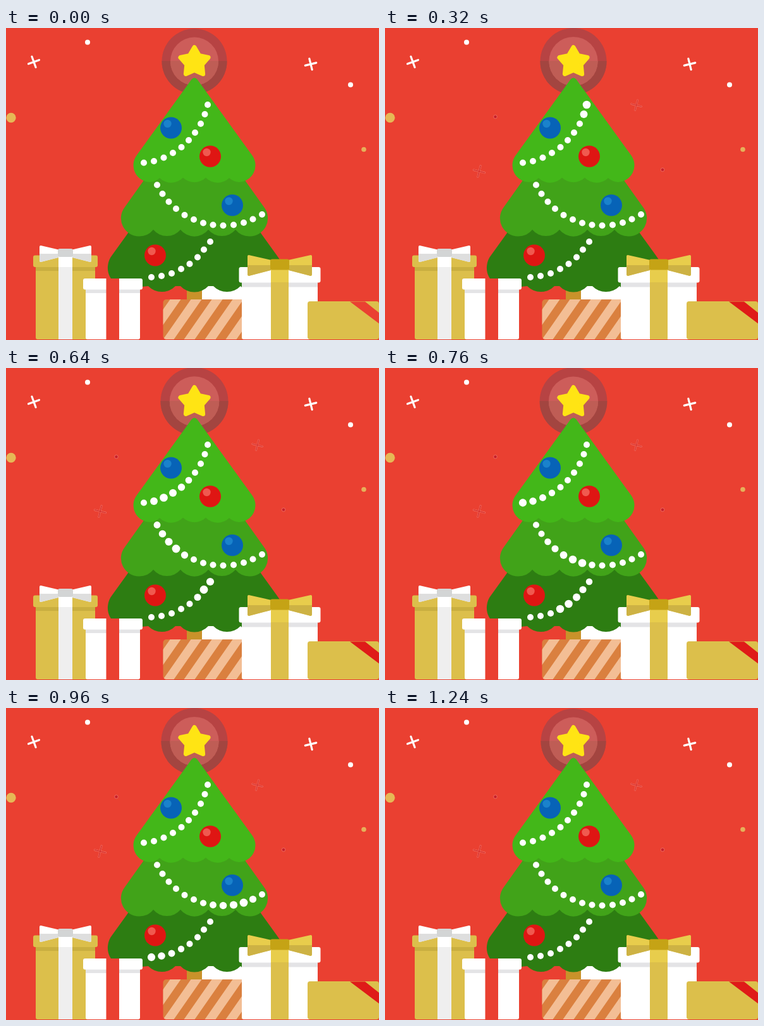
These frames come from a looping animation (590 by 492 pixels, 1.28 s). An HTML page:

```html
<!DOCTYPE html>
<html lang="en">
<head>
<meta charset="utf-8">
<title>Christmas tree</title>
<style>
  html, body { margin: 0; width: 100%; height: 100%; overflow: hidden; background: #ea4031; }
  svg { display: block; }
</style>
</head>
<body>
<svg width="590" height="492" viewBox="0 0 590 492">
  <defs>
    <clipPath id="lowerHalf"><rect y="52" width="590" height="80"/></clipPath>
    <clipPath id="stripedBox"><rect x="248.500" y="428" width="130" height="63" rx="5"/></clipPath>
    <path id="plus" d="M-9 0H9M0-9V9" stroke-linecap="round"/>
  </defs>

  <!-- sky -->
  <g fill="#fff" stroke="#fff" stroke-width="3.2">
    <use href="#plus" transform="translate(44 53.5) rotate(-20)"/>
    <use href="#plus" transform="translate(482 57) rotate(-14)"/>
  </g>
  <circle cx="129" cy="22.5" r="4" fill="#fff"/>
  <circle cx="545" cy="89.5" r="4" fill="#fff"/>
  <circle cx="8" cy="141.5" r="7.7" fill="#e6b856"/>
  <circle cx="566" cy="191.5" r="3.8" fill="#e6b05a"/>
  <g id="embers" fill="#c9202a" stroke="#f2786b">
    <g id="emberCross">
      <use href="#plus" transform="translate(149 226) rotate(14)" stroke-width="2.8"/>
      <use href="#plus" transform="translate(149 226) rotate(14)" stroke="#d9302c" stroke-width="1.5"/>
    </g>
    <use href="#emberCross" transform="translate(262 -84) scale(.91)"/>
    <circle cx="174.5" cy="140" r="2.8" stroke-width=".8"/>
    <circle cx="439" cy="223.5" r="2.8" stroke-width=".8"/>
  </g>

  <!-- star -->
  <g id="glow">
    <circle class="outer" cx="298" cy="52.5" fill="#b74343"/>
    <circle class="outer" cx="298" cy="52.5" fill="#a34540" clip-path="url(#lowerHalf)"/>
    <circle class="inner" cx="298" cy="52.5" fill="#cd5d5a"/>
    <circle class="inner" cx="298" cy="52.5" fill="#bf5d55" clip-path="url(#lowerHalf)"/>
  </g>
  <path id="star" fill="#ffe414" stroke="#ffe414" stroke-width="7" stroke-linejoin="round"/>

  <!-- tree -->
  <path fill="#fff" d="M310 407h64v22h-64z"/>
  <path fill="#c9922a" d="M286 410h24v19h-24z"/>
  <path fill="#2d7d12" d="M298 178L428 358A32 32 0 0 1 371 407A30 30 0 0 1 328 407H320A30 30 0 0 1 276 407H268A30 30 0 0 1 225 407L195 410A32 32 0 0 1 168 358Z"/>
  <path fill="#41a319" d="M298 128L408.500 283A28.500 28.500 0 0 1 385 328.500A28.500 28.500 0 0 1 363 318A28 28 0 0 1 320 318A28 28 0 0 1 276 318A28 28 0 0 1 233 318A28.500 28.500 0 0 1 211 328.500A28.500 28.500 0 0 1 187.500 283Z"/>
  <path fill="#43b719" d="M293.500 81Q298 76 302.500 81L389.500 201A26.500 26.500 0 0 1 368 243A26.500 26.500 0 0 1 353 236.500A26 26 0 0 1 316 236A26 26 0 0 1 280 236A26 26 0 0 1 243 236.500A26.500 26.500 0 0 1 228 243A26.500 26.500 0 0 1 206.500 201Z"/>
  <g id="baubles"></g>
  <g id="beads" fill="#fff"></g>

  <!-- gold gift -->
  <path fill="#dcbf4b" d="M47 370h94v118q0 3-3 3H50q-3 0-3-3z"/>
  <path fill="#c9ae3f" d="M47 377h94v6H47z"/>
  <rect x="43" y="358.500" width="102" height="18.500" rx="3" fill="#dcbf4b"/>
  <path fill="#efefef" d="M83 359h22v132H83z"/>
  <path fill="#fff" d="M83 359h22v18H83z"/>
  <path fill="#fff" d="M55 343L94 352L133 343Q135 343 135 345V367Q135 369 133 369L94 359L55 369Q53 369 53 367V345Q53 343 55 343Z"/>
  <path fill="#dedede" d="M53 356H83V362L55 369L53 367ZM135 356H105V362L133 369L135 367Z"/>
  <rect x="82" y="348" width="24" height="13" rx="3" fill="#d3d5d5"/>

  <!-- small white gift -->
  <path fill="#fff" d="M126 405h86v83q0 3-3 3h-80q-3 0-3-3z"/>
  <path fill="#e4e4e6" d="M126 412h86v6h-86z"/>
  <rect x="122" y="395" width="94" height="17.5" rx="3" fill="#fff"/>
  <path fill="#ea4031" d="M158.500 395H179V492H158.500z"/>

  <!-- striped gift -->
  <g clip-path="url(#stripedBox)">
    <path fill="#da803f" d="M248 428h131v64H248z"/>
    <path id="stripes" fill="#f3be95"/>
  </g>

  <!-- large white gift -->
  <path fill="#fff" d="M373 390h120v98q0 3-3 3H376q-3 0-3-3z"/>
  <path fill="#e4e4e6" d="M373 401h120v7.500H373z"/>
  <rect x="368.500" y="377" width="129" height="24.500" rx="3" fill="#fff"/>
  <path fill="#dcbf4b" d="M419 377h28v114h-28z"/>
  <path fill="#e8cd4c" d="M419 377h28v24h-28z"/>
  <path fill="#e8cd4c" d="M384 358L433 369L482 358Q484 358 484 360V389Q484 391 482 391L433 378L384 391Q382 391 382 389V360Q382 358 384 358Z"/>
  <path fill="#cdb244" d="M382 374H419V382L384 391L382 389ZM484 374H447V382L482 391L484 389Z"/>
  <rect x="418" y="364.500" width="30" height="17" rx="3" fill="#c5a315"/>

  <!-- corner gift -->
  <rect x="477" y="431" width="113" height="60" rx="4" fill="#dcbf4b"/>
  <path id="ribbon" d="M544 431.500H568L590 449V466Z"/>
</svg>
<script>
const LOOP = 1280, STEP = 40, BEAD_DELAY = 46;
const el = id => document.getElementById(id);

function addCircle(parent, cx, cy, r, fill) {
  const c = document.createElementNS('http://www.w3.org/2000/svg', 'circle');
  const attrs = fill ? { cx, cy, r, fill } : { cx, cy, r };
  for (const key in attrs) c.setAttribute(key, attrs[key]);
  return parent.appendChild(c);
}

const starPoints = Array.from({ length: 10 }, (_, i) => {
  const r = i % 2 ? 12.8 : 23.2, a = i * Math.PI / 5;
  return [298 + r * Math.sin(a), 53.7 - r * Math.cos(a)];
});
el('star').setAttribute('d', `M${starPoints.join('L')}Z`);

let stripes = '';
for (let x = 259.5; x < 440; x += 33) stripes += `M${x} 428h17l-44 63h-17z`;
el('stripes').setAttribute('d', stripes);

const blue = ['#0763b7', '#1a82cc'], red = ['#df1613', '#f0594f'];
for (const [x, y, [body, shine]] of [[261, 157.5, blue], [323, 202.5, red], [358, 279.5, blue], [236, 358.5, red]]) {
  addCircle(el('baubles'), x, y, 17, body);
  addCircle(el('baubles'), x - 5.5, y - 6.5, 6.2, shine);
}

// Each garland lights up bead by bead, beginning at its start time.
const garlands = [
  { start: 295, points: [[319, 121], [314.5, 136], [308, 151], [299, 165], [289, 177], [277.5, 188],
    [264, 197], [249.5, 204.5], [234, 210], [218, 212.5]] },
  { start: 490, points: [[239, 247.5], [247.5, 261.5], [257.5, 274], [269, 285], [282.5, 295], [297, 302],
    [312, 307.5], [327.5, 310.5], [343.5, 311.5], [360, 310.5], [376, 307], [390.5, 301.5], [405, 294]] },
  { start: 586, points: [[323, 337], [313, 349.5], [303, 361.5], [290.5, 372], [277, 380], [262, 387],
    [246, 391], [230, 393]] }
];
const beads = garlands.flatMap(({ start, points }) => points.map(([x, y], i) =>
  ({ peak: start + i * BEAD_DELAY, dot: addCircle(el('beads'), x, y, 5) })));

function pulse(dt) {
  return Math.max(0, dt < 0 ? 1 + dt / 60 : 1 - dt / 210);
}

function setRadius(selector, r) {
  document.querySelectorAll(selector).forEach(c => c.setAttribute('r', r));
}

function draw(now) {
  const t = Math.floor(now % LOOP / STEP) * STEP;
  const swell = (1 - Math.cos(2 * Math.PI * t / LOOP)) / 2;
  setRadius('.outer', 51.5 + 2 * swell);
  setRadius('.inner', 38 + 1.2 * swell);
  for (const { peak, dot } of beads) dot.setAttribute('r', 5 + 1.5 * pulse(t - peak));
  const lit = t >= STEP;
  el('embers').style.display = lit ? '' : 'none';
  el('ribbon').setAttribute('fill', lit ? '#df1a18' : '#ea4031');
}

const begin = performance.now();
function tick() {
  draw(performance.now() - begin);
  requestAnimationFrame(tick);
}
tick();
</script>
</body>
</html>
```
